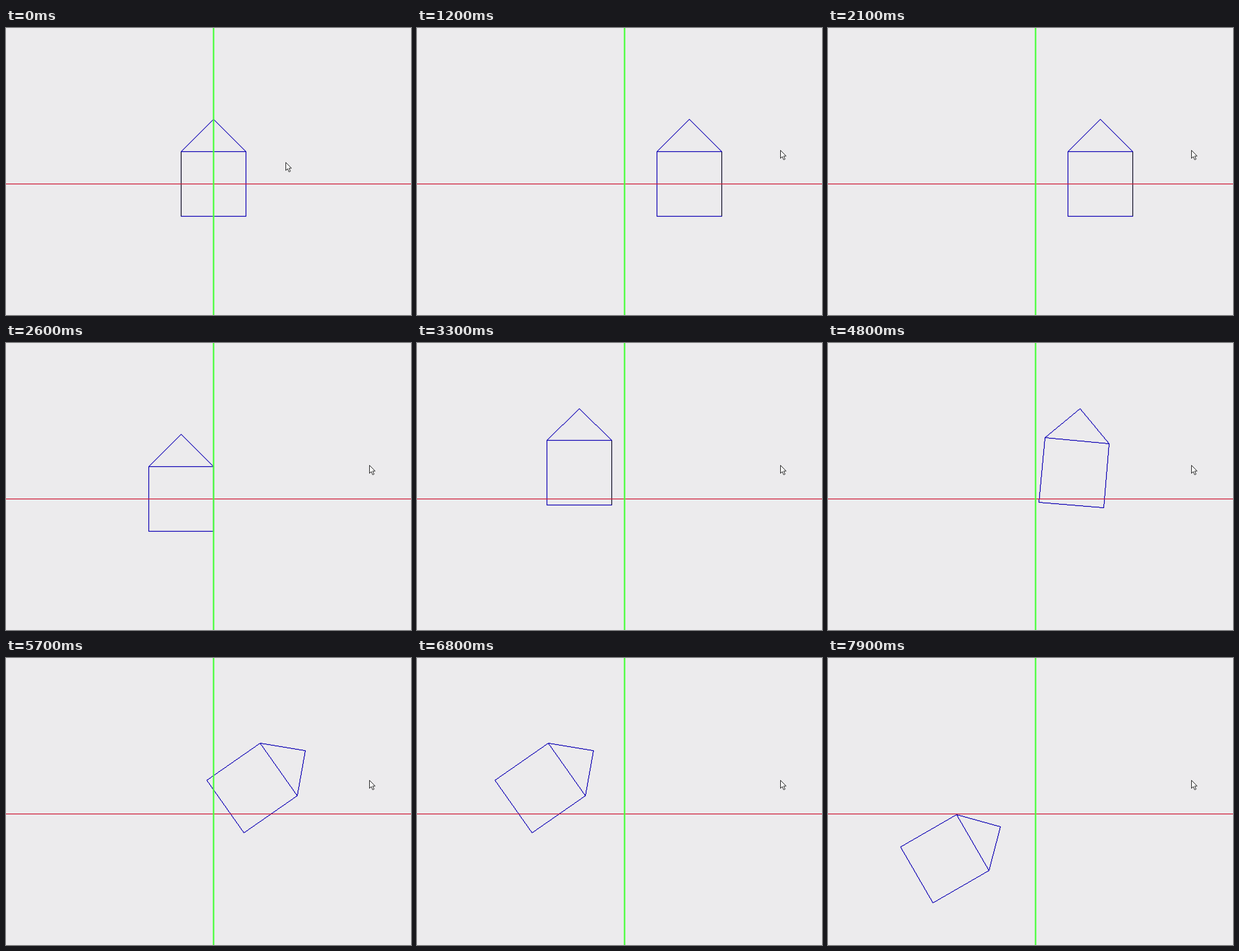
Write an HTML page with a canvas that moves like this. It is 600 by 426 pixels and loops after 8 s.

```html
<!DOCTYPE html>
<html lang="en">
<head>
<meta charset="utf-8">
<title>House transform</title>
<style>
  html, body { margin: 0; width: 100%; height: 100%; overflow: hidden; background: #ecebed; }
  canvas { display: block; }
</style>
</head>
<body>
<canvas id="stage" width="600" height="426"></canvas>
<script>
const ctx = document.getElementById('stage').getContext('2d');
const LOOP = 8000, DELAY = 350, REPEAT = 33;
const UNIT = 95.9, OX = 306.7, OY = 230.8;
const BLUE = '#1206b4', BLACK = '#101014', HALO = 'rgba(30, 16, 190, .22)';

// Held keys: axis, direction, press time, number of steps
const keys = [
  ['x', 1, 556, 19], ['x', -1, 1505, 26], ['y', 1, 2860, 5],
  ['x', 1, 3500, 13], ['y', -1, 4420, 1], ['turn', 1, 4720, 11],
  ['x', -1, 5850, 19], ['y', -1, 6870, 11], ['turn', 1, 7650, 1],
  ['x', -1, 7840, 1]
];

// One step on press, then auto-repeat after a delay
function stepsAt(t, press, count) {
  if (t < press) return 0;
  const held = t - press - DELAY;
  return Math.min(count, held < 0 ? 1 : 2 + Math.floor(held / REPEAT));
}

function poseAt(t) {
  const pose = { x: 0, y: 0, turn: 0 };
  for (const [axis, dir, press, count] of keys) pose[axis] += dir * stepsAt(t, press, count);
  return pose;
}

// Hard-edged one pixel line with a faint soft edge
function line([x0, y0], [x1, y1], color) {
  ctx.strokeStyle = HALO;
  ctx.lineWidth = 2;
  ctx.beginPath();
  ctx.moveTo(x0 + .5, y0 + .5);
  ctx.lineTo(x1 + .5, y1 + .5);
  ctx.stroke();
  ctx.fillStyle = color;
  const n = Math.max(Math.abs(x1 - x0), Math.abs(y1 - y0));
  for (let i = 0; i <= n; i++) {
    const k = n ? i / n : 0;
    ctx.fillRect(Math.round(x0 + (x1 - x0) * k), Math.round(y0 + (y1 - y0) * k), 1, 1);
  }
}

function drawHouse({ x, y, turn }) {
  const a = turn * 5 * Math.PI / 180, c = Math.cos(a), s = Math.sin(a);
  const at = (u, v) => [
    Math.round(OX + UNIT * (x / 10 + u * c - v * s)),
    Math.round(OY + UNIT * (-y / 10 + u * s + v * c))
  ];
  const tl = at(-.5, -.5), tr = at(.5, -.5), br = at(.5, .5), bl = at(-.5, .5), top = at(0, -1);
  line(tl, bl, !turn && !x ? BLACK : BLUE);
  line(tr, br, !turn && x ? BLACK : BLUE);
  line(tl, tr, BLUE);
  line(bl, br, BLUE);
  line(tl, top, BLUE);
  line(top, tr, BLUE);
}

function bar(color, x, y, w, h) {
  ctx.fillStyle = color;
  ctx.fillRect(x, y, w, h);
}

function drawAxes() {
  bar('rgba(230, 60, 90, .12)', 0, 230, 600, 3);
  bar('#cc1834', 0, 231, 600, 1);
  bar('rgba(90, 255, 70, .6)', 306, 0, 3, 426);
  bar('#3cff32', 307, 0, 1, 426);
}

const arrow = new Path2D('M.5 .5V12.5L3.2 9.9L5.2 14.6L7.3 13.7L5.3 9.1H8.9Z');

function drawCursor(t) {
  const k = Math.min(1, Math.max(0, (t - 50) / 600));
  const e = k * k * (3 - 2 * k);
  ctx.save();
  ctx.translate(Math.round(414 + 124 * e), Math.round(199 - 18 * e));
  ctx.fillStyle = '#f8f8f8';
  ctx.fill(arrow);
  ctx.strokeStyle = '#303030';
  ctx.lineWidth = 1;
  ctx.stroke(arrow);
  ctx.restore();
}

const start = performance.now();

function frame() {
  const t = (performance.now() - start) % LOOP;
  bar('#ecebed', 0, 0, 600, 426);
  drawHouse(poseAt(t));
  drawAxes();
  drawCursor(t);
  requestAnimationFrame(frame);
}
frame();
</script>
</body>
</html>
```
